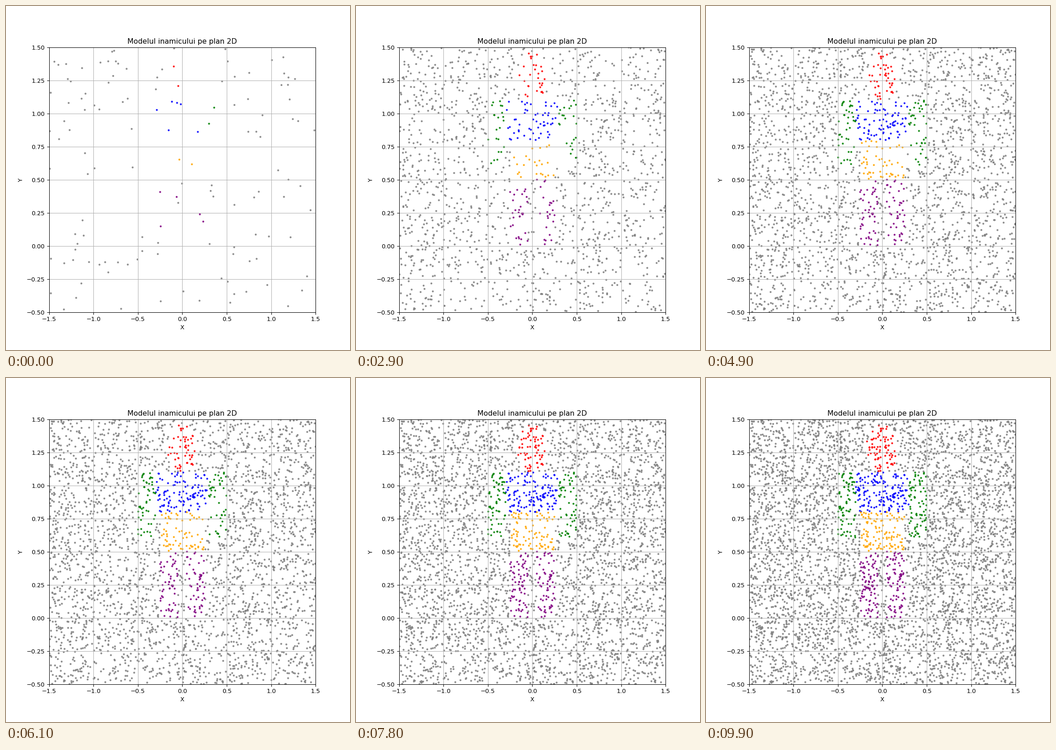
A matplotlib script that plays this animation: 748x748 px, repeating every 10000 ms.

```python
import numpy as np
import matplotlib.pyplot as plt
from matplotlib.animation import FuncAnimation

FRAMES, INTERVAL = 100, 100
START, STEP = 134, 50

rng = np.random.default_rng(12)


def box(x, y, x0, x1, y0, y1):
    return (x >= x0) & (x <= x1) & (y >= y0) & (y <= y1)


def classify(x, y):
    """Colour of each point by the body part it hits, grey for a miss."""
    parts = {
        "blue": box(x, y, -0.3, 0.3, 0.8, 1.1),
        "red": np.hypot(x, y - 1.28) <= 0.18,
        "green": box(abs(x), y, 0.3, 0.5, 0.6, 1.1),
        "orange": box(x, y, -0.25, 0.25, 0.5, 0.8),
        "purple": box(abs(x), y, 0.05, 0.25, 0.0, 0.5),
    }
    return np.select(list(parts.values()), list(parts), "gray")


total = START + STEP * (FRAMES - 1)
points = rng.uniform((-1.5, -0.5), (1.5, 1.5), (total, 2))

fig, ax = plt.subplots(figsize=(8, 8), dpi=93.5)
dots = ax.scatter(*points.T, c=classify(*points.T), s=5, alpha=0.8)
ax.set(xlim=(-1.5, 1.5), ylim=(-0.5, 1.5), xlabel="X", ylabel="Y",
       title="Modelul inamicului pe plan 2D",
       xticks=np.arange(-1.5, 1.6, 0.5), yticks=np.arange(-0.5, 1.6, 0.25))
ax.grid(True)


def update(i):
    dots.set_offsets(points[:START + STEP * i])
    return dots,


anim = FuncAnimation(fig, update, frames=FRAMES, interval=INTERVAL,
                     init_func=lambda: update(0), repeat=True, repeat_delay=0)
plt.show()
```
